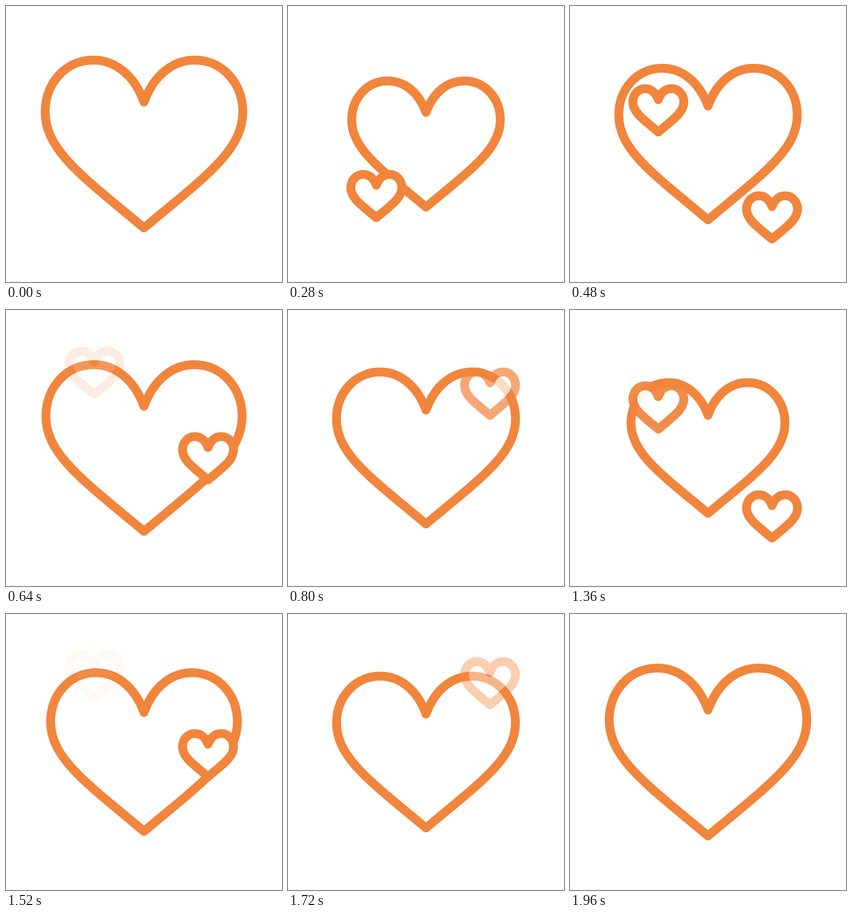
Recreate the animation shown at these times as an HTML page. Size 500 by 500 pixels, loop 2000 ms.

```html
<!DOCTYPE html>
<html lang="en">
<head>
<meta charset="utf-8">
<title>Beating heart</title>
<style>
  html, body { margin: 0; width: 100%; height: 100%; overflow: hidden; background: #fff; }
  svg { display: block; width: 100%; height: 100%; }
</style>
</head>
<body>
<svg viewBox="0 0 500 500">
  <defs>
    <path id="heart" d="M0-76C-19-128-55-152-92-152C-142-152-179-110-179-58C-179 12-110 60 0 152C110 60 179 12 179-58C179-110 142-152 92-152C55-152 19-128 0-76Z"/>
  </defs>
  <g fill="#fff" stroke="#f1853c" stroke-linejoin="round">
    <use id="big" href="#heart"/>
    <use id="left" href="#heart"/>
    <use id="right" href="#heart"/>
  </g>
</svg>
<script>
const LOOP = 2000, STEP = 40, LINE = 16;
const RISE = 566, SMALL = 0.258;
const BEAT = [[0, 1], [90, 1], [290, 0.75], [620, 1], [750, 0.89], [960, 1], [1000, 1]];
const floaters = [
  { id: 'left', x: 160, starts: [100, 962] },
  { id: 'right', x: 366, starts: [362, 1226] }
];

const clamp = v => Math.min(1, Math.max(0, v));
const ease = u => u * u * (3 - 2 * u);
const mix = (a, b, u) => a + (b - a) * u;

function place(id, x, y, scale, opacity) {
  const el = document.getElementById(id);
  // The line keeps its weight at every scale.
  el.setAttribute('transform', `translate(${x} ${y}) scale(${scale})`);
  el.setAttribute('stroke-width', LINE / scale);
  el.setAttribute('opacity', opacity);
}

function beatScale(t) {
  const i = BEAT.findIndex(key => key[0] > t);
  const [t0, a] = BEAT[i - 1], [t1, b] = BEAT[i];
  return mix(a, b, ease((t - t0) / (t1 - t0)));
}

function draw(t) {
  place('big', 250, 250, beatScale(t % 1000), 1);
  for (const { id, x, starts } of floaters) {
    const start = t < starts[1] ? starts[0] : starts[1];
    const u = clamp((t - start) / RISE);
    const tip = mix(456.5, 151, ease(u));
    const opacity = Math.min(clamp(u / 0.19), clamp((1 - u) / 0.32));
    place(id, x, tip - 152 * SMALL, SMALL, opacity);
  }
}

const begin = performance.now();
function tick() {
  const t = (performance.now() - begin) % LOOP;
  draw(Math.floor(t / STEP) * STEP);
  requestAnimationFrame(tick);
}
tick();
</script>
</body>
</html>
```
